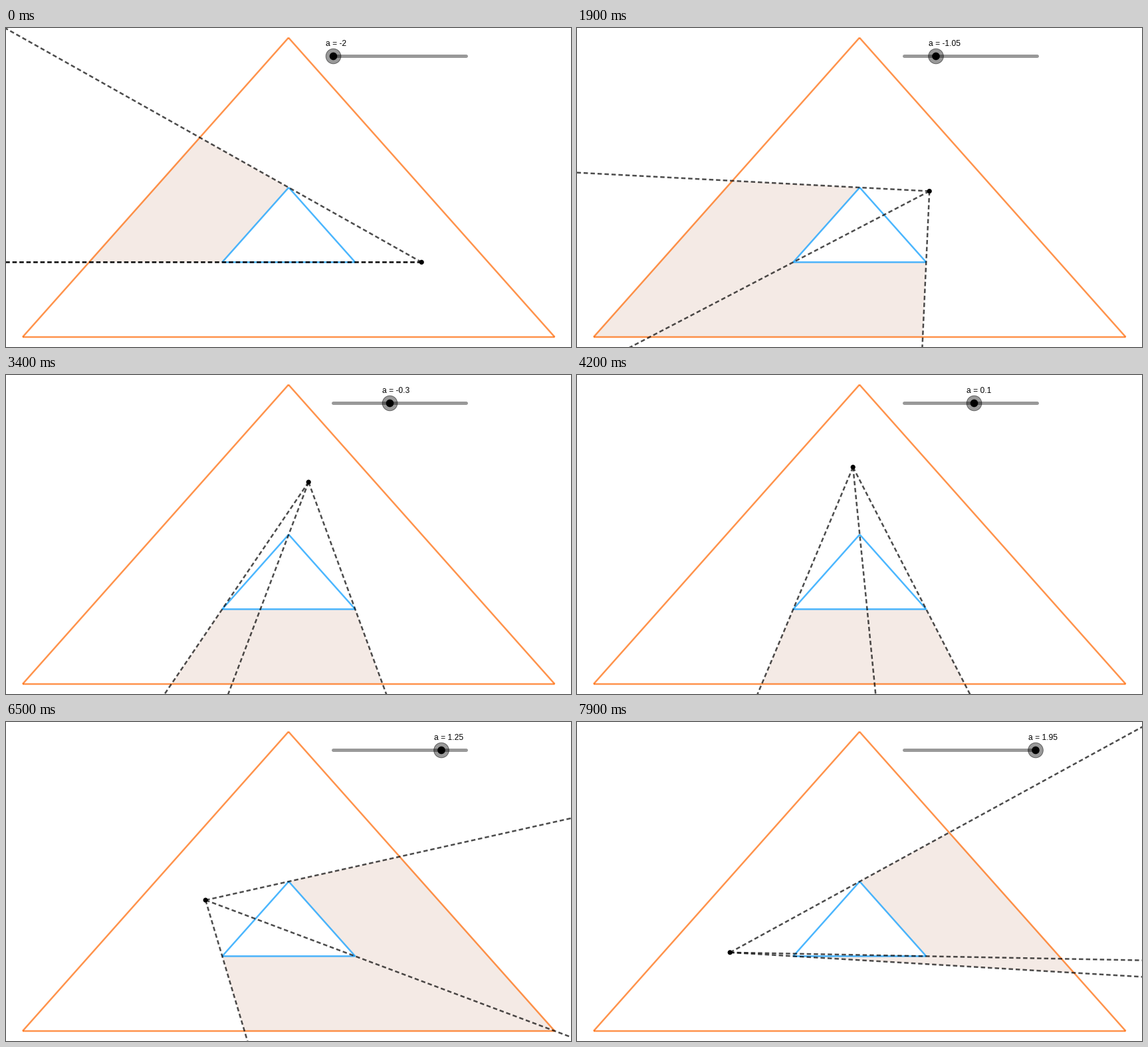
A matplotlib script that plays this animation: 850 px wide and 480 px high, repeating every 8 s.

```python
import numpy as np
import matplotlib.pyplot as plt
from matplotlib.animation import FuncAnimation
from matplotlib.collections import LineCollection
from matplotlib.patches import Circle, Polygon

W, H, DPI = 850, 480, 100
PX = 72 / DPI  # points per pixel
FRAMES, STEP = 80, 100

OUTER = np.array([(425, 14.6), (25, 465), (825.5, 465)])
INNER = np.array([(425.3, 240), (325.3, 352.4), (525.3, 352.4)])

fig = plt.figure(figsize=(W / DPI, H / DPI), dpi=DPI, facecolor="white")
ax = fig.add_axes([0, 0, 1, 1])
ax.set(xlim=(0, W), ylim=(H, 0))
ax.axis("off")


def add_triangle(pts, color, z):
    sides = [(pts[i], pts[(i + 1) % 3]) for i in range(3)]
    ax.add_collection(LineCollection(sides, colors=color, linewidths=2.5 * PX,
                                     alpha=0.7, zorder=z, snap=False),
                      autolim=False)


def add_disc(radius, z, **style):
    return ax.add_patch(Circle((0, 0), radius, zorder=z, **style))


# Shaded region, cut to the outer triangle
bounds = Polygon(OUTER, transform=ax.transData)
shadow = ax.add_patch(Polygon(np.zeros((4, 2)), fc="#993300", alpha=0.1,
                              lw=0, zorder=1))
shadow.set_clip_path(bounds.get_path(), bounds.get_transform())
ax.add_patch(Polygon(INNER, fc="white", lw=0, zorder=2))

add_triangle(OUTER, "#ff6600", 3)
add_triangle(INNER, "#0099ff", 4)

rays = [ax.plot([], [], color="black", alpha=0.7, lw=2.5 * PX, zorder=5,
                ls=(0, (2.6, 1.6)), snap=False)[0] for _ in INNER]
source = add_disc(3.6, 6, fc="black", lw=0)

# Slider
ax.plot([492.5, 692.5], [42.5, 42.5], color="black", alpha=0.4, lw=5 * PX,
        solid_capstyle="round", zorder=7, snap=False)
ring = add_disc(11.3, 8, fc=(0, 0, 0, 0.4), ec=(0, 0, 0, 0.5), lw=PX)
knob = add_disc(5.8, 9, fc="black", lw=0)
label = ax.text(0, 27, "", family="Liberation Sans", size=12 * PX,
                va="baseline", zorder=10)


def cast_shadow(p):
    """Polygon behind the inner triangle, bounded by its outermost rays."""
    mid = INNER.mean(axis=0) - p
    d = INNER - p
    turn = np.arctan2(mid[0] * d[:, 1] - mid[1] * d[:, 0], d @ mid)
    lo, hi = INNER[turn.argmin()], INNER[turn.argmax()]
    return [lo, beyond(p, lo, 4000), beyond(p, hi, 4000), hi]


def beyond(p, q, dist):
    return p + (q - p) / np.hypot(*(q - p)) * dist


def update(k):
    a = (k - FRAMES // 2) / 20
    p = np.array([425.2 - 100 * a, 127.4 + 112.5 * abs(a)])
    source.center = p
    shadow.set_xy(cast_shadow(p))
    for ray, vertex in zip(rays, INNER):
        ray.set_data(*zip(p, beyond(p, vertex, 1200)))
    x = 592.5 + 50 * a
    ring.center = knob.center = (x, 42.5)
    label.set_x(x - 11)
    label.set_text(f"a = {a:g}")
    return [shadow, *rays, source, ring, knob, label]


anim = FuncAnimation(fig, update, frames=FRAMES, interval=STEP, repeat=True,
                     repeat_delay=0)
plt.show()
```
